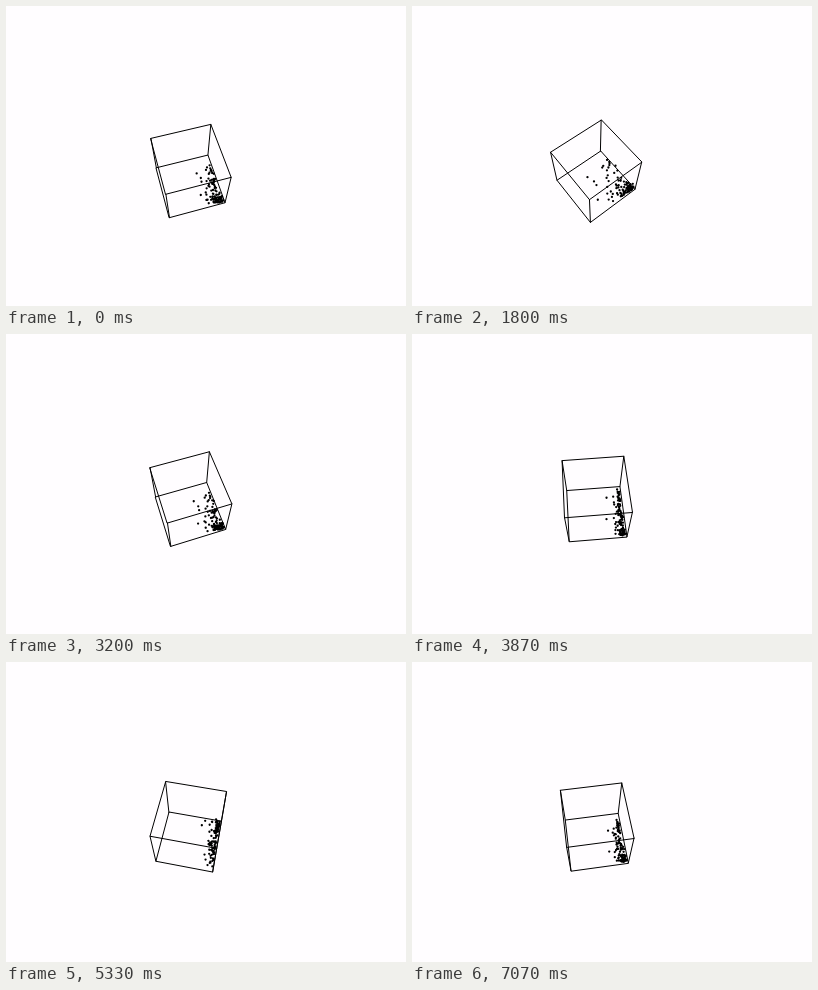
Write an HTML page that moves like this. It is 400 px wide and 300 px high and loops after 7140 ms.

```html
<!DOCTYPE html>
<html lang="en">
<head>
<meta charset="utf-8">
<title>Rotating box of particles</title>
<style>
  html, body { margin: 0; width: 100%; height: 100%; overflow: hidden; background: #fffdff; }
  svg { display: block; width: 400px; height: 300px; }
  path { fill: none; stroke: #000; stroke-linecap: round; stroke-linejoin: round; }
</style>
</head>
<body>
<svg viewBox="0 0 400 300">
  <path id="edges" stroke-width="1"></path>
  <path id="dots" stroke-width="2.3"></path>
</svg>
<script>
const LOOP = 7140, STEP = 200 / 3, LAST_STEP = 106;
const COUNT = 105;
const rad = Math.PI / 180;

// [step, box angle in degrees]: nine quarter turns per loop
const TURN = [[0, 15.8], [15, 126.9], [38, 301], [58, 454.9], [80, 618.7], [94, 727.1], [107, 825.8]];

const camera = { x: 183.7, y: 149.4, focal: 335, pitch: 60 * rad, down: 0.278, depth: 5.593 };

const mod = (a, n) => ((a % n) + n) % n;
const mix = (a, b, k) => a + (b - a) * k;
const smooth = (from, to, v) => {
  const k = Math.min(1, Math.max(0, (v - from) / (to - from)));
  return k * k * (3 - 2 * k);
};

let seed = 71;
function random() {
  seed = (seed * 16807) % 2147483647;
  return seed / 2147483647;
}
const tail = (mean, max) => Math.min(max, -mean * Math.log(1 - random()));

const particles = Array.from({ length: COUNT }, () => ({
  wallGap: 0.02 + tail(0.05, 0.35),
  spread: 0.02 + tail(0.17, 0.65),
  cornerGap: random() < 0.82 ? 0.02 + tail(0.08, 0.4) : 0.2 + 0.6 * random(),
  height: 0.01 + tail(0.035, 0.18),
  start: 50 + 43 * random()
}));

function angleAt(step) {
  const i = TURN.findIndex(([s]) => s > step);
  const [s0, a0] = TURN[i - 1], [s1, a1] = TURN[i];
  return mix(a0, a1, (step - s0) / (s1 - s0));
}

// Box coordinates: x right, z away from the viewer, h up; all within +-0.5
function project(x, z, h, angle) {
  const c = Math.cos(angle * rad), s = Math.sin(angle * rad);
  const wx = x * c - z * s, wz = x * s + z * c;
  const cp = Math.cos(camera.pitch), sp = Math.sin(camera.pitch);
  const scale = camera.focal / (camera.depth + wz * cp - h * sp);
  const px = camera.x + wx * scale;
  const py = camera.y + (camera.down - wz * sp - h * cp) * scale;
  return px.toFixed(2) + " " + py.toFixed(2);
}

function boxPath(angle) {
  const corners = [[-0.5, 0.5], [0.5, 0.5], [0.5, -0.5], [-0.5, -0.5]];
  const ring = h => corners.map(([x, z]) => project(x, z, h, angle));
  const top = ring(0.5), bottom = ring(-0.5);
  const loop = points => "M" + points.join("L") + "Z";
  return loop(top) + loop(bottom) + top.map((p, i) => "M" + p + "L" + bottom[i]).join("");
}

// Once per quarter turn, particles fall to the right-hand wall, slide to its
// front corner and spread along the next wall
function dotsPath(angle) {
  const phase = 50 + mod(angle - 50, 90);
  return particles.map(p => {
    const settled = mix(p.cornerGap, p.wallGap, smooth(50, 82, phase));
    const fromWall = mix(settled, p.spread, smooth(88, 122, phase));
    const fromCorner = mix(1 - p.spread, p.cornerGap, smooth(p.start, p.start + 34, phase));
    const at = project(0.5 - fromWall, fromCorner - 0.5, p.height - 0.5, phase - 90);
    return "M" + at + "h0.01";
  }).join("");
}

const edges = document.getElementById("edges");
const dots = document.getElementById("dots");

function draw(ms) {
  const step = Math.min(LAST_STEP, Math.floor((mod(ms, LOOP) + 3.4) / STEP));
  const angle = angleAt(step);
  edges.setAttribute("d", boxPath(angle));
  dots.setAttribute("d", dotsPath(angle));
}

const begin = performance.now();
function tick() {
  draw(performance.now() - begin);
  requestAnimationFrame(tick);
}
tick();
</script>
</body>
</html>
```
